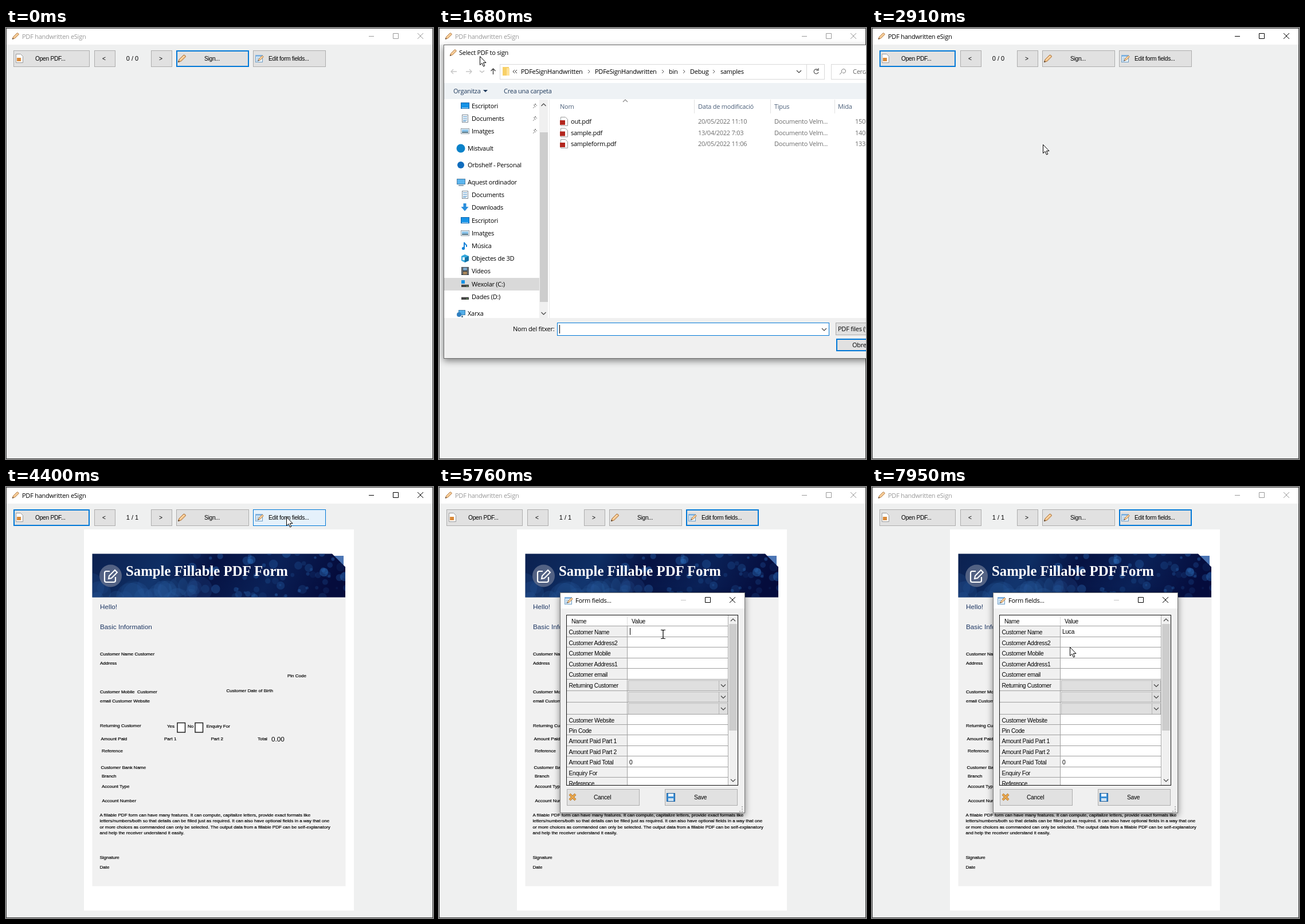
Write an HTML page that moves like this. It is 745 px wide and 752 px high and loops after 8 s.

```html
<!DOCTYPE html>
<html lang="en">
<head>
<meta charset="utf-8">
<title>PDF form demo</title>
<style>
html, body { margin: 0; width: 100%; height: 100%; overflow: hidden; background: #eff0f0 }
svg { display: block }
text { white-space: pre }
.s { font: 11px "Open Sans", "Noto Sans", sans-serif; letter-spacing: -.25px }
.u { font: 10.25px "Liberation Sans", Arial, sans-serif; letter-spacing: -.3px }
.n { font: 11px "Liberation Sans", Arial, sans-serif }
.p { font: 8px "Liberation Sans", Arial, sans-serif; stroke: #000; stroke-width: .2px }
.h { font: 11.75px "Liberation Sans", Arial, sans-serif }
.t { font: bold 24.75px "Liberation Serif", serif }
.btn rect { fill: #e1e1e1; stroke: #adadad }
.btn .ring { display: none; fill: none }
.hover rect { fill: #e5f1fb; stroke: #0078d7 }
.press rect { fill: #cce4f7; stroke: #005499 }
.focus rect { stroke: #0078d7 }
.focus .ring { display: block }
.dialog { filter: drop-shadow(0 4px 6px #0007) }
</style>
</head>
<body>
<svg id="stage" width="745" height="752" viewBox="0 0 745 752"></svg>
<script>
const rect = (x, y, w, h, fill, stroke = 'none', extra = '') =>
  `<rect x="${x}" y="${y}" width="${w}" height="${h}" fill="${fill}" stroke="${stroke}" ${extra}/>`;
const box = (x, y, w, h, fill, stroke) => rect(x + .5, y + .5, w - 1, h - 1, fill, stroke);
const text = (x, y, str, cls = 's', fill = '#000') =>
  `<text x="${x}" y="${y}" class="${cls}" fill="${fill}">${str}</text>`;
const line = (d, stroke, w = 1, extra = '') => `<path d="${d}" fill="none" stroke="${stroke}" stroke-width="${w}" ${extra}/>`;
const shape = (d, fill, stroke = 'none') => `<path d="${d}" fill="${fill}" stroke="${stroke}"/>`;
const dot = (x, y, r, fill, extra = '') => `<circle cx="${x}" cy="${y}" r="${r}" fill="${fill}" ${extra}/>`;
const group = (id, body, extra = '') => `<g id="${id}" ${extra}>${body}</g>`;
const at = (x, y, body, s = 1) => `<g transform="translate(${x} ${y}) scale(${s})">${body}</g>`;
const chevron = (x, y, dir = 1, c = '#444') => line(`M${x - 4} ${y - 2 * dir}l4 ${4 * dir}l4 ${-4 * dir}`, c, 1.2);

const button = (id, x, y, w, h, tx, label) => group(id,
  box(x, y, w, h) + rect(x + 1.5, y + 1.5, w - 3, h - 3, '', '', 'class="ring"'), 'class="btn"') +
  text(tx, y + 18, label, 'u');

// Icons in a 16 by 16 box
const pencil = shape('M1.5 14.5L3 10L11 2Q14 2 14.5 5L6.5 13Z', '#f3c184', '#a8703a') +
  line('M4.5 11L12.5 3.5', '#fff0d6') + shape('M1 15l1-3l2 2Z', '#4b3a2a');
const formIcon = box(1, 2, 13, 13, '#eaf4fc', '#6d9cc4') + rect(1, 2, 13, 3, '#7fb2e0') +
  line('M3 7.5h8M3 10.5h6M3 12.5h4', '#79a7cf') + at(5, 2, pencil, .7);
const pageIcon = shape('M2.5 .5h8l4 4v11h-12z', '#fff', '#9a9a9a');
const pdfIcon = pageIcon + rect(1, 6, 9, 8, '#b3261e');
const docIcon = box(3, 1, 11, 14, '#fff', '#7c8a96') + line('M5 4.5h7M5 7.5h7M5 10.5h7M5 12.5h5', '#4a90c8');
const screenIcon = box(1, 2, 15, 11, '#1592e6', '#0a63ad') + line('M3 11.5h11', '#bfe3fa');
const pictureIcon = box(1, 3, 15, 10, '#fff', '#8b9aa5') + rect(3, 5, 11, 4, '#8cc4ea') + rect(3, 9, 11, 2, '#4d7183');
const driveIcon = rect(2, 9, 13, 4, '#444') + rect(2, 8, 13, 1, '#bbb') + rect(11, 11, 2, 1, '#7fe06b');
const icons = {
  doc: docIcon, screen: screenIcon, picture: pictureIcon, drive: driveIcon,
  ring: dot(8, 8, 7.5, '#0a82c9'), disc: dot(8, 8, 6, '#0f6cbd'),
  pc: box(1, 2, 15, 10, '#5bb5ee', '#4b7fa5') + rect(4, 13, 9, 1.5, '#67879d'),
  down: shape('M5.5 1h5v6h4l-6.5 7.5l-6.5-7.5h4z', '#2b8fdd'),
  note: line('M7 12V2q1 3 4 5v3', '#1583d8', 2) + dot(5.5, 12.5, 2.6, '#1583d8'),
  cube: shape('M2 4l6-3l7 3v8l-7 3l-6-3z', '#35a8dc') + shape('M8 7l7-3v8l-7 3z', '#1472a5') + rect(4, 6, 4, 5, '#dff2fa'),
  film: rect(2, 1, 13, 14, '#3b4248') + rect(5, 2, 7, 5, '#7ba5c8') + rect(5, 9, 7, 5, '#a6855b') +
    line('M3.5 2v12M13.5 2v12', '#ddd', 1, 'stroke-dasharray="1 1"'),
  system: driveIcon + rect(2, 1, 6, 6, '#1592e6'),
  net: box(4, 2, 12, 9, '#53aee8', '#3d7da8') + dot(5, 10, 4, '#2f7fc0') + rect(9, 12, 3, 3, '#67879d')
};

const winButtons = (x, y, minColor) =>
  line(`M${x - 5} ${y + .5}h9`, minColor) +
  line(`M${x + 37.5} ${y - 4.5}h9v9h-9z`, 'currentColor') +
  line(`M${x + 80} ${y - 5}l10 10m0-10l-10 10`, 'currentColor');

const mainWindow = group('main',
  rect(0, 0, 745, 752, '#eff0f0') + rect(1, 1, 743, 28, '#fff') +
  at(10, 7, pencil, .85) + text(28, 19, 'PDF handwritten eSign', 's', 'currentColor') +
  winButtons(638, 14, 'currentColor')) +
  button('open', 13, 39, 133, 29, 51, 'Open PDF...') + at(15, 45, pageIcon + rect(4, 7, 7, 6, '#d98a3a')) +
  button('prev', 154, 39, 37, 29, 168, '&lt;') + button('next', 253, 39, 37, 29, 267, '>') +
  button('sign', 297, 39, 127, 29, 346, 'Sign...') + at(299, 45, pencil) +
  button('edit', 431, 39, 127, 29, 458, 'Edit form fields...') + at(434, 45, formIcon) +
  '<text id="count" x="220.5" y="57" class="n" text-anchor="middle"></text>';

// Soft spots of light for the header picture
let seed = 11;
const rnd = () => (seed = seed * 16807 % 2147483647) / 2147483647;
const spots = Array.from({ length: 75 }, () =>
  dot(320 + rnd() * 275, 114 + rnd() * 80, 2 + rnd() * 6, '#2d70bd', `opacity="${.1 + rnd() * .32}"`)).join('');
const clouds = Array.from({ length: 26 }, () =>
  dot(145 + rnd() * 195, 172 + rnd() * 26, 10 + rnd() * 16, '#2f66aa', `opacity="${.1 + rnd() * .12}"`)).join('');

const labels = [
  [164, 294, 'Customer Name Customer'], [164, 310, 'Address'], [491, 332, 'Pin Code'],
  [164, 360, 'Customer Mobile  Customer'], [384.5, 358, 'Customer Date of Birth'],
  [164, 376, 'email Customer Website'], [164, 419, 'Returning Customer'],
  [281, 420, 'Yes'], [317, 420, 'No'], [349.5, 420, 'Enquiry For'],
  [165.5, 442, 'Amount Paid'], [276, 442, 'Part 1'], [357.5, 442, 'Part 2'], [439, 442, 'Total'],
  [167, 463, 'Reference'], [165.5, 492, 'Customer Bank Name'], [167, 507, 'Branch'],
  [167, 525, 'Account Type'], [167.5, 550, 'Account Number'],
  [163.5, 575, 'A fillable PDF form can have many features. It can compute, capitalize letters, provide exact formats like'],
  [163.5, 585, 'letters/numbers/both so that details can be filled just as required. It can also have optional fields in a way that one'],
  [163.5, 596, 'or more choices as commanded can only be selected. The output data from a fillable PDF can be self-explanatory'],
  [163.5, 606, 'and help the receiver understand it easily.'],
  [163.5, 649, 'Signature'], [163.5, 666, 'Date']];
const page = group('page',
  rect(136, 74, 471, 665, '#fff') + rect(150.5, 138, 442, 558.5, '#f1f1f1') +
  shape('M572 120H589V139H592V142Z', '#4b75b4') +
  `<g clip-path="url(#banner)">${rect(150, 116, 443, 77, 'url(#night)')}${clouds}${spots}</g>` +
  dot(182.5, 155, 19.5, '#65718f', 'opacity=".8"') +
  line('M181 147h-6q-3 0-3 3v13q0 3 3 3h13q3 0 3-3v-6', '#fff', 2.2) +
  line('M179 160l1-5l10-10l4 4l-10 10z', '#fff', 2) +
  text(209, 155, 'Sample Fillable PDF Form', 't', '#fff') +
  text(164, 213, 'Hello!', 'h', '#1f3864') + text(164, 248, 'Basic Information', 'h', '#1f3864') +
  labels.map(([x, y, s]) => text(x, y, s, 'p')).join('') + text(463, 444, '0.00', 'h') +
  [299, 330].map(x => rect(x, 411.5, 13.5, 16.5, '#fff', '#222', 'stroke-width="1.5"')).join(''));

const places = [
  [136, 'Escriptori', 'screen', 1], [158, 'Documents', 'doc', 1], [180, 'Imatges', 'picture', 1],
  [210, 'Mistvault', 'ring', 0], [239, 'Orbshelf - Personal', 'disc', 0], [269, 'Aquest ordinador', 'pc', 0],
  [291, 'Documents', 'doc', 1], [313, 'Downloads', 'down', 1], [336, 'Escriptori', 'screen', 1],
  [358, 'Imatges', 'picture', 1], [380, 'Música', 'note', 1], [402, 'Objectes de 3D', 'cube', 1],
  [424, 'Vídeos', 'film', 1], [447, 'Wexolar (C:)', 'system', 1], [469, 'Dades (D:)', 'drive', 1], [498, 'Xarxa', 'net', 0]];
const files = [['out.pdf', '20/05/2022 11:10', 150], ['sample.pdf', '13/04/2022 7:03', 140], ['sampleform.pdf', '20/05/2022 11:06', 133]];
const crumbs = [[143, 'PDFeSignHandwritten'], [272, 'PDFeSignHandwritten'], [401, 'bin'], [438, 'Debug'], [491, 'samples']];
const headers = [[211, 'Nom'], [452, 'Data de modificació'], [585, 'Tipus'], [696, 'Mida']];

const fileDialog = group('fileDialog',
  rect(8.5, 29.5, 760, 547, '#fff', '#6a6a6a') + at(18, 36, pencil, .85) + text(35, 47, 'Select PDF to sign') +
  line('M31 76H21m4-4l-4 4l4 4M47 76h10m-4-4l4 4l-4 4', '#c6c6c6', 1.3) + chevron(75, 76, .7, '#b8b8b8') +
  line('M94.5 81V71m-4 4l4-4l4 4', '#444', 1.4) +
  box(106, 63, 567, 27, '#fff', '#d9d9d9') + line('M641.5 63v26', '#d9d9d9') +
  rect(111, 68, 11, 15, '#f8d067') + rect(118, 70, 5, 13, '#ffe39a') + line('M132 73l-3 3l3 3m4-6l-3 3l3 3', '#333') +
  crumbs.map(([x, s]) => text(x, 80, s)).join('') +
  [262, 391, 428, 480].map(x => line(`M${x - 2} 73l3 3l-3 3`, '#555')).join('') + chevron(628, 76) +
  line('M661 73a4 4 0 1 0 1 4M662 70v4h-4', '#555', 1.2) +
  box(684, 63, 90, 27, '#fff', '#d9d9d9') + line('M699 81l4-4a3.5 3.5 0 1 1 1 1', '#777') + text(722, 80, 'Cerca', 's', '#666') +
  rect(9, 96, 740, 28, '#eef2f5') + rect(24, 98, 71, 24, '#cfe6f8', '#8cc4ee', 'id="organize"') +
  text(25, 114, 'Organitza', 's', '#1e395b') + shape('M77 108h8l-4 4z', '#1e395b') + text(113, 114, 'Crea una carpeta', 's', '#1e395b') +
  rect(9, 436, 166, 22, '#d9d9d9') +
  places.map(([y, s, icon, sub]) => at(sub ? 37 : 30, y - 8, icons[icon]) + text(sub ? 57 : 50, y + 4, s)).join('') +
  [136, 158, 180].map(y => line(`M164 ${y + 4}l3-3m-2-3l4 4m-2-6l4 4m-5-1l3-3`, '#888')).join('') +
  rect(175, 125, 15, 381, '#f0f0f0') + rect(176, 182, 14, 296, '#cdcdcd') + chevron(182.5, 134, -1) + chevron(182.5, 498) +
  line('M192.5 125v381', '#e8e8e8') + line('M445.5 125v24M578.5 125v24M690.5 125v24', '#e1e1e1') + chevron(325, 127, -1, '#888') +
  headers.map(([x, s]) => text(x, 141, s, 's', '#4c607a')).join('') +
  files.map(([name, date, size], i) => {
    const y = 167 + 19.5 * i;
    return rect(201, y - 13.5, 560, 19.5, 'none', 'none', `id="file${i}"`) + at(210, y - 12, pdfIcon) +
      text(230, y, name) + [[452, date], [585, 'Documento Velm...'], [726, size]].map(([x, s]) => text(x, y, s, 's', '#6d6d6d')).join('');
  }).join('') +
  rect(9, 506, 740, 70, '#f0f0f0') + text(129, 529, 'Nom del fitxer:') +
  box(206, 514, 475, 23, '#fff', '#0078d7') + chevron(672, 526) + rect(210, 518, 1, 15, '#000', 'none', 'id="fileCaret"') +
  text(211, 529, '<tspan id="fileName"></tspan>') +
  box(692, 514, 90, 22, '#e1e1e1', '#adadad') + text(696, 529, 'PDF files (*.pdf)') +
  rect(694, 543, 90, 20, '#e1e1e1', '#0078d7', 'stroke-width="2"') + text(721, 557, 'Obre'), 'class="dialog"');

const rowTops = [243, 262, 280, 299, 317, 336, 356, 376, 397, 415, 433, 452, 470, 489, 507, 526];
const fields = ['Customer Name', 'Customer Address2', 'Customer Mobile', 'Customer Address1', 'Customer email', 'Returning Customer', '', '',
  'Customer Website', 'Pin Code', 'Amount Paid Part 1', 'Amount Paid Part 2', 'Amount Paid Total', 'Enquiry For', 'Reference'];
const formDialog = group('formDialog',
  box(211, 184, 323, 385, '#f0f0f0', '#777') + rect(212, 185, 321, 27, '#fff') + at(218, 190, formIcon) +
  text(238, 202, 'Form fields...') + winButtons(427, 197, '#c4c4c4') +
  rect(223, 224, 298, 297, '#fff') + text(231, 238, 'Name', 'u') + text(336, 238, 'Value', 'u') + line('M328.5 225v17', '#ddd') +
  fields.map((s, i) => {
    const y = rowTops[i], h = rowTops[i + 1] - y, combo = i > 4 && i < 8;
    return rect(223, y, 106, h, '#f0f0f0') +
      (combo ? box(330, y + 1, 174, h - 1, '#dfdfdf', '#b4b4b4') + line(`M488.5 ${y + 1}v${h - 1}`, '#b4b4b4') + chevron(496, y + h / 2 + .5) : '') +
      line(`M223 ${y - .5}H505`, '#a0a0a0') + text(226.5, y + (combo ? 14 : 13.5), s, 'u');
  }).join('') + text(332, 484, '0', 'u') + line('M328.5 243V521M504.5 224V521', '#a0a0a0') +
  rect(506, 224, 15, 297, '#f0f0f0') + rect(506, 239, 14, 186, '#cdcdcd') + chevron(513, 232, -1) + chevron(513, 512) +
  rect(212, 520, 321, 8, '#f0f0f0') + box(222, 223, 300, 298, 'none', '#111') +
  button('cancel', 223, 527, 127, 29, 270, 'Cancel') + line('M228 536l10 10m0-10l-10 10', '#a86a1f', 4) + line('M228 536l10 10m0-10l-10 10', '#eba94f', 2.5) +
  button('save', 394, 527, 127, 29, 445, 'Save') + box(397, 534, 15, 15, '#3b8fd6', '#1d5e9c') + rect(400, 535, 9, 5, '#e8f3fb') + rect(400, 543, 9, 5, '#cfe2f1') +
  line('M524 566h2m2 0h2m-2-4h2m-2 0h0m0-4h2', '#b5b5b5', 2) +
  text(332, 256, '<tspan id="typed"></tspan>', 'u') + rect(332, 246, 1, 12, '#000', 'none', 'id="caret"'), 'class="dialog"');

const cursors = group('arrow', shape('M.5 .5V15.5L4 12.3L6.5 18L8.8 17L6.4 11.5H11Z', '#fff', '#000')) +
  group('beam', line('M-4 -7.5h3l1 1l1-1h3M0-6.5V6.5M-4 7.5h3l1-1l1 1h3', '#000', 1.2));

stage.innerHTML = `<defs>
  <clipPath id="banner"><path d="M150.5 116.5H569L592 139.5V192.5H150.5Z"/></clipPath>
  <linearGradient id="night" x2="1" y2=".1"><stop stop-color="#0c2150"/><stop offset=".3" stop-color="#0e2e64"/>
  <stop offset=".5" stop-color="#061242"/><stop offset=".75" stop-color="#0a2157"/><stop offset="1" stop-color="#050c3c"/></linearGradient>
  </defs>` + mainWindow + page + box(0, 0, 745, 752, 'none', '#3a3a3a') + fileDialog + formDialog + cursors;

const $ = id => document.getElementById(id);
const clamp = v => Math.max(0, Math.min(1, v));
const show = (id, on) => $(id).style.visibility = on ? 'inherit' : 'hidden';
const mark = (id, ...names) => $(id).setAttribute('class', ['btn', ...names].filter(Boolean).join(' '));

// Pointer legs: start, end, number of steps, x, y
const legs = [[250, 670, 6, 71, 49], [1880, 2090, 3, 75, 108], [2090, 2500, 6, 298, 203], [3990, 4400, 6, 489, 52],
  [5000, 5290, 4, 440, 292], [5490, 5670, 2, 391, 257], [7000, 7500, 1, 344, 257], [7880, 7950, 1, 345, 279]];
function pointer(t) {
  let x = 679, y = 659;
  for (const [a, b, n, tx, ty] of legs) {
    const k = t < a ? 0 : clamp((Math.floor(n * (t - a) / (b - a) + .01) + 1) / (n + 1));
    x += (tx - x) * k;
    y += (ty - y) * k;
  }
  return [x, y];
}

function fade(id, k, cx, cy) {
  const s = .93 + .07 * k;
  $(id).style.opacity = k;
  $(id).style.display = k ? '' : 'none';
  $(id).setAttribute('transform', `translate(${cx * (1 - s)} ${cy * (1 - s)}) scale(${s})`);
}

function draw(t) {
  const within = (a, b) => t >= a && t < b;
  const [x, y] = pointer(t);

  $('main').style.color = within(940, 1140) || within(2710, 4800) ? '#000' : '#999';
  mark('open', (within(940, 1140) || within(2710, 4600)) && 'focus', within(670, 1410) && 'hover', within(940, 1010) && 'press');
  mark('sign', t < 940 && 'focus');
  mark('edit', t >= 4600 && 'focus', within(4400, 4800) && 'hover', within(4530, 4600) && 'press');
  mark('save', t < 5760 && 'focus');
  $('count').textContent = t < 3520 ? '0 / 0' : '1 / 1';
  show('page', t >= 3520);

  fade('fileDialog', t < 1410 ? 0 : t < 2710 ? clamp((t - 1340) / 270) : clamp((2840 - t) / 200), 480, 300);
  const picked = t >= 2570;
  files.forEach((f, i) => {
    const over = x > 201 && y >= 153.5 + 19.5 * i && y < 173 + 19.5 * i;
    $('file' + i).setAttribute('fill', picked && i === 2 ? '#cce8ff' : over ? '#e5f3ff' : 'none');
  });
  show('organize', y > 97 && y < 123 && x < 96);
  $('fileName').textContent = picked ? 'sampleform.pdf' : '';
  show('fileCaret', within(1610, 2140));

  fade('formDialog', t < 4800 ? 0 : clamp((t - 4730) / 270), 372, 376);
  $('typed').textContent = 'Luca'.slice(0, Math.max(0, Math.floor((t - 6220) / 200)));
  $('caret').setAttribute('x', 333 + Math.round($('typed').getComputedTextLength()));
  show('caret', within(5760, 6290) || within(6420, 7550));

  const beam = within(5760, 6420) || within(7550, 7880);
  show('beam', beam);
  show('arrow', t >= 250 && !beam && !within(6420, 7550));
  for (const id of ['arrow', 'beam']) $(id).setAttribute('transform', `translate(${Math.round(x)} ${Math.round(y)})`);
}

const start = performance.now();
(function tick() {
  draw((performance.now() - start) % 8000);
  requestAnimationFrame(tick);
})();
</script>
</body>
</html>
```
